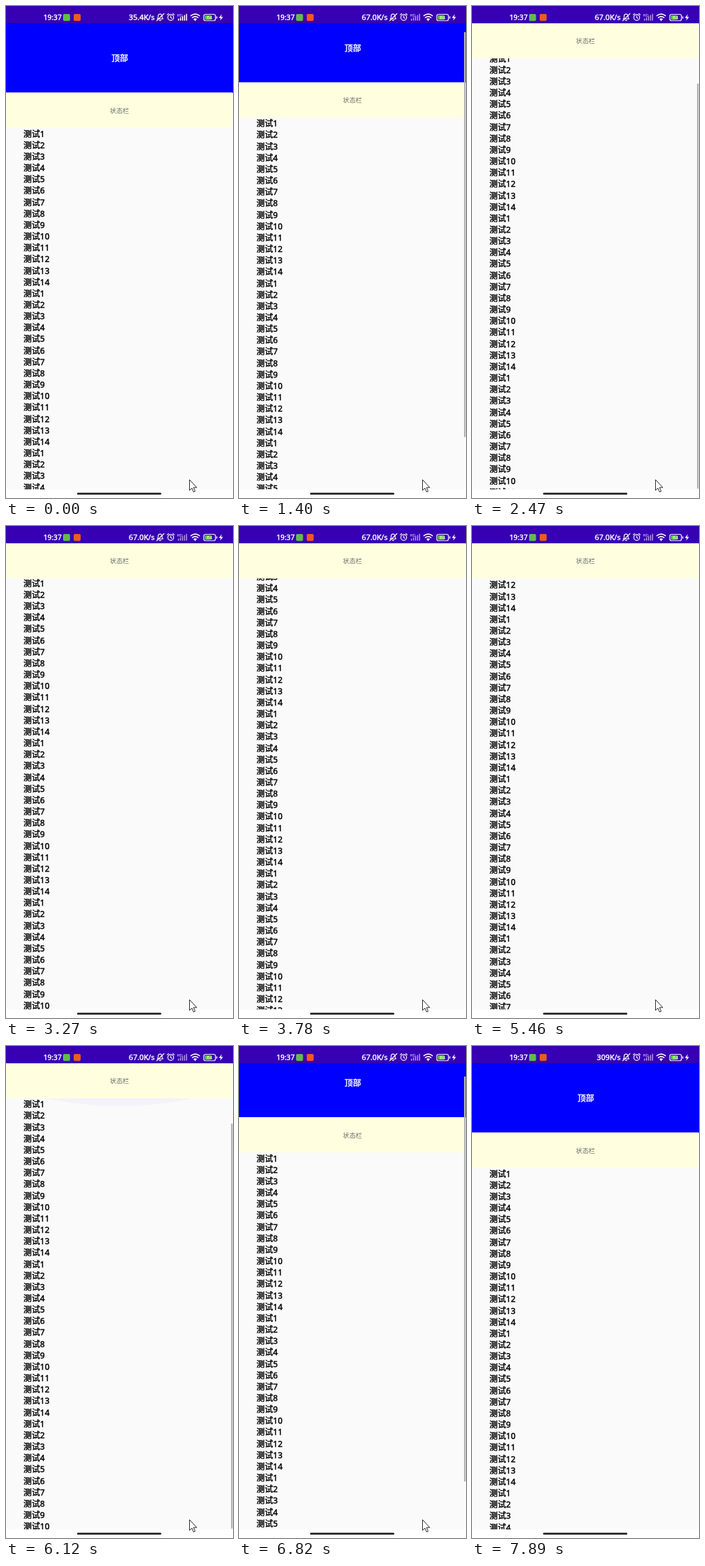
Recreate the animation shown at these times as an HTML page. Size 342 px wide and 740 px high, loop 8360 ms.

```html
<!DOCTYPE html>
<html lang="zh-CN">
<head>
<meta charset="utf-8">
<title>吸顶滚动</title>
<style>
html, body { margin: 0; width: 100%; height: 100%; overflow: hidden; background: #fff; }
svg { display: block; width: 342px; height: 740px; }
text { font-family: "Noto Sans", "Noto Sans CJK SC", "Noto Sans CJK", sans-serif; font-weight: 500; }
.mid { text-anchor: middle; }
.bold { stroke-width: .45; stroke-linejoin: round; }
.line { fill: none; stroke: #fff; stroke-width: 1.2; stroke-linecap: round; stroke-linejoin: round; }
</style>
</head>
<body>
<svg viewBox="0 0 342 740">
  <rect width="342" height="740" fill="#fff"/>
  <rect x="1" y="26" width="340" height="701" fill="#fafafa"/>
  <g id="rows" class="bold" font-size="12.5" fill="#000" stroke="#000"></g>
  <circle id="topGlow" cx="171" r="525" fill="#6200ee"/>
  <circle id="endGlow" cx="171" r="525" fill="#6200ee"/>

  <g id="head">
    <rect y="26" width="342" height="104.5" fill="#00f"/>
    <text class="mid bold" x="171.5" y="83" font-size="12.5" fill="#fff" stroke="#fff">顶部</text>
    <rect y="130" width="341" height="53" fill="#ffffe0"/>
    <text class="mid" x="171" y="160.5" font-size="9.6" fill="#6c6c68" style="font-weight:400">状态栏</text>
  </g>
  <rect id="thumb" x="339" width="2.5" height="609" fill="#b4b4b4"/>

  <g id="status" fill="#fff">
    <rect width="342" height="26" fill="#3700b3"/>
    <text class="bold" stroke="#fff" x="56.5" y="21" font-size="10.7">19:37</text>
    <rect x="86" y="12" width="10.5" height="10.5" rx="2" fill="#5fbd4b"/>
    <rect x="102" y="12" width="10.5" height="10.5" rx="2" fill="#f2581f"/>
    <text id="speed" class="bold" stroke="#fff" x="224" y="21" font-size="11.3" text-anchor="end"></text>
    <path class="line" d="M228 19.5h8.5l-1.3-2v-2.3a3 3 0 0 0-6 0v2.3zM231 21.7h2.4M227 22.2L238 11.5"/>
    <circle class="line" cx="248.2" cy="17.2" r="4.4"/>
    <path class="line" d="M248.2 14.8v2.7l1.8 1M243 13.2l2-1.7M253.4 13.2l-2-1.7"/>
    <text x="257.5" y="15.5" font-size="5.6">HD</text>
    <g id="bars"></g>
    <path class="line" d="M278.5 14.6q6.5-5 13 0M280.8 17.4q4.2-3.2 8.4 0" style="stroke-width:1.7"/>
    <path d="M282.3 19.4q2.7-1.8 5.4 0l-2.7 3.3z"/>
    <rect class="line" x="298" y="12.5" width="17.5" height="9.5" rx="2.6"/>
    <rect x="299.6" y="14" width="10" height="6.5" rx="1" fill="#62c34a"/>
    <rect x="316.8" y="15.5" width="1.4" height="3.5"/>
    <text class="mid" x="306.8" y="20" font-size="7.4">64</text>
    <path d="M325 12.2l-4.2 5.7h2.8l-1 4.1 4.4-5.6h-2.9z"/>
  </g>

  <rect y="727" width="342" height="13" fill="#fff"/>
  <rect x="107" y="732" width="127" height="3" rx="1.5" fill="#303030"/>
  <path id="cursor" d="M276.5 712.5v16l3.6-3.4 2.5 5.8 2.4-1-2.5-5.7h4.9z" fill="#fff" stroke="#222" stroke-width="1"/>
</svg>
<script>
const LOOP = 8360, ROW = 17.16, HEAD = 104.3, VIEW = 700;
const $ = id => document.getElementById(id);

// Tables of [time in ms, value]
const scroll = [[0, 0], [1210, 0], [2000, 104], [2470, 113], [3270, 346], [4150, 417],
  [4720, 417], [5460, 292], [5980, 104.3], [6180, 104.3], [7100, 0]];
const endGlow = [[4100, 0], [4440, 41], [4560, 42], [5150, 0]];
const topGlow = [[5960, 0], [6080, 13], [6160, 11], [6400, 0]];
const thumb = [[1210, 0], [1300, 1], [2500, 1], [2750, 0], [6010, 0], [6080, 1], [7400, 1], [7660, 0]];

function valueAt(track, t) {
  const next = track.findIndex(([time]) => time > t);
  if (next < 0) return track[track.length - 1][1];
  if (next === 0) return track[0][1];
  const [t0, a] = track[next - 1], [t1, b] = track[next];
  const p = (t - t0) / (t1 - t0);
  return a + (b - a) * p * p * (3 - 2 * p);
}

function add(parent, tag, attrs, text = "") {
  const node = document.createElementNS(parent.namespaceURI, tag);
  for (const key in attrs) node.setAttribute(key, attrs[key]);
  node.textContent = text;
  parent.append(node);
}

for (let i = 0; i < 56; i++) {
  add($("rows"), "text", { x: 26.3, y: 196.6 + i * ROW }, "测试" + (i % 14 + 1));
}
for (let i = 0; i < 5; i++) {
  const height = 3 + i * 1.8;
  add($("bars"), "rect", { x: 259 + i * 3, y: 22 - height, width: 1.9, height });
}

const shift = (id, y) => $(id).setAttribute("transform", `translate(0 ${-y})`);

function setGlow(id, height, y) {
  $(id).setAttribute("cy", y);
  $(id).setAttribute("opacity", height * 0.0026);
}

function draw(t) {
  const offset = valueAt(scroll, t), headOffset = Math.min(offset, HEAD);
  shift("rows", offset);
  shift("head", headOffset);
  $("thumb").setAttribute("y", 26 + headOffset * VIEW / (VIEW + HEAD));
  $("thumb").setAttribute("opacity", valueAt(thumb, t));
  const low = valueAt(endGlow, t), high = valueAt(topGlow, t);
  setGlow("endGlow", low, 727 - low + 525);
  setGlow("topGlow", high, 78.5 + high - 525);
  $("speed").textContent = t < 890 ? "35.4K/s" : t < 6890 ? "67.0K/s" : "309K/s";
  $("bars").setAttribute("opacity", t < 890 ? 0.85 : 0.5);
  $("cursor").setAttribute("visibility", t < 7840 ? "visible" : "hidden");
}

const start = performance.now();
function tick(now) {
  draw(Math.max(0, now - start) % LOOP);
  requestAnimationFrame(tick);
}
draw(0);
requestAnimationFrame(tick);
</script>
</body>
</html>
```
